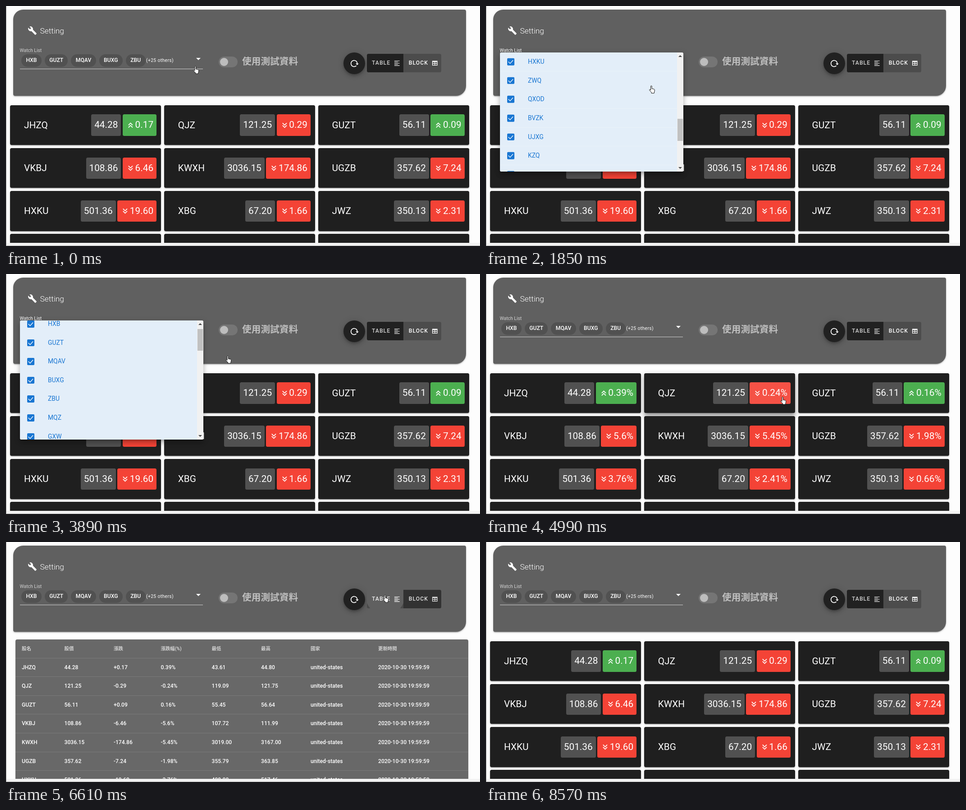
These frames come from a looping animation (1052x532 px, 9.6 s). An HTML page:

```html
<!DOCTYPE html>
<html lang="zh-TW">
<head>
<meta charset="utf-8">
<title>Watch list</title>
<style>
html, body { margin: 0; width: 100%; height: 100%; overflow: hidden; background: #fdfdfd; }
#stage { position: absolute; width: 1052px; height: 532px; overflow: hidden; color: #fff;
  font: 12.13px Roboto, "Noto Sans CJK TC", "Noto Sans CJK", sans-serif; }
#stage div { position: absolute; box-sizing: border-box; white-space: nowrap; }
svg { display: block; fill: none; stroke: currentColor; stroke-width: 2; }
.panel { background: #606060; border-radius: 22px 4px 22px 4px; }
.panel, .card, .table { box-shadow: 0 3px 1px -2px #0003, 0 2px 2px #0002, 0 1px 5px #0002; }
.chips { display: flex; gap: 7px; line-height: 27.7px; font-weight: 500; }
.chips span { background: #515151; border-radius: 14px; padding: 0 10.4px; }
.fab { background: #212121; border-radius: 50%; padding: 14px; box-shadow: 0 3px 5px -1px #0003, 0 5px 9px #0002, 0 1px 16px #0002; }
.button { font-weight: 500; letter-spacing: 1.08px; line-height: 41.6px; padding-left: 11.5px; }
.button svg { position: absolute; right: 6.5px; top: 13px; }
.card { background: #1f1f1f; border-radius: 3.5px; font-size: 20.8px; line-height: 88px; padding-left: 31px; }
.card.raised { box-shadow: 0 5px 5px -3px #0004, 0 8px 10px 1px #0003, 0 3px 12px 2px #0002; }
.badges { right: 10px; top: 20.5px; display: flex; gap: 3.5px; line-height: 47.3px; }
.badges span { display: flex; align-items: center; height: 47.3px; padding: 0 6.93px; border-radius: 3.5px; background-color: #515151; }
.badges b { font-weight: 400; }
.badges .up { background-color: #4caf50; }
.badges .down { background-color: #f44336; }
.down svg { transform: scaleY(-1); }
.table { background: #1e1e1e; border-radius: 4px; font-weight: 500; }
.row { line-height: 41.6px; border-bottom: 1px solid #ffffff1f; }
.head { font-size: 10.4px; font-weight: 700; color: #ffffffb8; }
.menu { overflow: hidden; background: #fff; border-radius: 3.5px;
  box-shadow: 0 5px 5px -3px #0003, 0 8px 10px 1px #0002, 0 3px 14px 2px #0002; }
.item { line-height: 41.6px; padding-left: 62.5px; background: #e3eef9; color: #1976d2; font-size: 13.87px; }
.item svg { position: absolute; left: 16.6px; top: 13px; background: currentColor; border-radius: 2px; stroke: #fff; }
.arrow { border: 4px solid transparent; }
</style>
</head>
<body>
<div id="stage"></div>
<script>
const icons = {
  chevrons: 'M6.7 17.7 12 12.4 17.3 17.7M6.7 11.7 12 6.4 17.3 11.7',
  reload: 'M16.7 17.7A8 8 0 1 1 19 12M17.4 13H20.6L19 14.6Z',
  lines: 'M3 4H21M3 8H15M3 12H21M3 16H15M3 20H21',
  grid: 'M4 5H20V19H4ZM4 7H20M4 13H20M12 8V19',
  check: 'M4 12 10 18 20 7',
  wrench: 'M22.7 19 13.6 9.9A7 7 0 0 0 4.7 1.7L9 6 6 9 1.6 4.7A7 7 0 0 0 9.8 13.6L18.9 22.7Q19.6 23.3 20.3 22.7L22.6 20.4Q23.3 19.7 22.7 19Z'
};
const icon = (name, size = 20.8, attributes = '') =>
  `<svg width="${size}" height="${size}" viewBox="0 0 24 24"><path d="${icons[name]}" ${attributes}/></svg>`;

const stage = document.getElementById('stage');
function add(parent, cls, x, y, w, h, html = '', css = '') {
  const el = document.createElement('div');
  const px = v => v === null ? 'auto' : v + 'px';
  el.className = cls;
  el.style.cssText = `left:${px(x)};top:${px(y)};width:${px(w)};height:${px(h)};${css}`;
  el.innerHTML = html;
  parent.append(el);
  return el;
}
const label = (x, mid, size, html, css = '') =>
  add(stage, '', x, mid - 15, null, 30, html, `font-size:${size}px;line-height:30px;${css}`);

// symbol, price, change, low, high; the percentage follows from price and change
const stocks = `JHZQ 44.28 +0.17 43.61 44.80
QJZ 121.25 -0.29 119.09 121.75
GUZT 56.11 +0.09 55.45 56.64
VKBJ 108.86 -6.46 107.72 111.99
KWXH 3036.15 -174.86 3019.00 3167.00
UGZB 357.62 -7.24 355.79 363.85
HXKU 501.36 -19.60 498.88 517.46
XBG 67.20 -1.66
JWZ 350.13 -2.31`.split('\n').map(line => {
  const [symbol, price, change, low, high] = line.split(' ');
  const percent = +(100 * change / (price - change)).toFixed(2) + '%';
  return { symbol, price, change, percent, low, high };
});
const watchList = ('HXB GUZT MQAV BUXG ZBU MQZ GXW JWZ XBG VZWJ QBUD QJZ UGZB KWXH XJ JHZQ VKBJ HXKU ' +
  'ZWQ QXOD BVZK UJXG KZQ XOWB DZVJ HQZU WXJ GVQK ZUJX YKZB').split(' ');
const pitch = 41.6;

// settings panel
add(stage, 'panel', 16, 8, 1005, 191);
add(stage, '', 48, 43.5, 20.8, 20.8, icon('wrench', 20.8, 'fill="currentColor" stroke="none"'));
label(75.5, 54.5, 17.33, 'Setting', 'font-weight:300');
const fieldLabel = label(30.5, 99, 10.4, 'Watch List');
add(stage, 'chips', 34, 107, null, 27.7, watchList.slice(0, 5).map(name => `<span>${name}</span>`).join(''));
label(311, 120.5, 10.4, '(+25 others)', 'letter-spacing:.35px');
add(stage, 'arrow', 421.5, 114.5, 0, 0, '', 'border-width:5px;border-top-color:#fff');
add(stage, '', 30.5, 139, 406.5, 1, '', 'background:#cfcfcf');
add(stage, '', 472, 111.5, 41.6, 24.3, '', 'background:#757575;border-radius:13px');
add(stage, '', 475, 115, 18, 18, '', 'background:#bdbdbd;border-radius:50%');
label(524, 123, 20.7, '使用測試資料', 'color:#bfbfbf;font-weight:700');
add(stage, 'fab', 748.5, 102.5, 48.5, 48.5, icon('reload'));
const tableButton = add(stage, 'button', 800.5, 105.5, 82, pitch, 'TABLE' + icon('lines', 15.6), 'border-radius:3.5px 0 0 3.5px');
const blockButton = add(stage, 'button', 882.3, 105.5, 84, pitch, 'BLOCK' + icon('grid', 15.6), 'border-radius:0 3.5px 3.5px 0');

// cards
const cardView = add(stage, '', 0, 0, 1052, 532);
const cards = [];
for (let i = 0; i < 12; i++) {
  const stock = stocks[i];
  const card = add(cardView, 'card', 9 + i % 3 * 341.8, 219.8 + Math.floor(i / 3) * 95.2, 335, 88.4);
  if (!stock) continue;
  const way = stock.change > 0 ? 'up' : 'down';
  card.innerHTML = `${stock.symbol}<div class="badges"><span>${stock.price}</span><span class="${way}">${icon('chevrons')}<b></b></span></div>`;
  cards.push({ card, stock, badge: card.querySelector('.' + way), value: card.querySelector('b') });
}

// table
const table = add(stage, 'table', 16, 216, 1005, 330);
const columns = [14, 108.5, 218, 322.5, 435.5, 545, 655, 805];
const rows = stocks.slice(0, 7).map(s =>
  [s.symbol, s.price, s.change, s.percent, s.low, s.high, 'united-states', '2020-10-30 19:59:59']);
[['股名', '股價', '漲跌', '漲跌幅(%)', '最低', '最高', '國家', '更新時間'], ...rows].forEach((cells, i) => {
  const row = add(table, i ? 'row' : 'row head', 0, i * pitch, 1005, pitch);
  cells.forEach((text, k) => add(row, '', columns[k], 0, null, pitch, text));
});

// window edges
add(stage, '', 0, 525, 1052, 7, '', 'background:#f3f3f3;border-bottom:1px solid #a8a8a8');
add(stage, '', 0, 0, 1, 532, '', 'background:#a0a0a0');

// dropdown menu
const menu = add(stage, 'menu', 30.5, 103, 407.5, 263.5);
const list = add(menu, '', 0, 0, 394, 1262);
const items = watchList.map((name, i) => add(list, 'item', 0, 7 + i * pitch, 394, pitch + .2, icon('check', 15.6) + name));
add(menu, '', 393.5, 0, 14, 264, '', 'background:#f1f1f1');
const thumb = add(menu, '', 394.5, 15, 11.5, 70, '', 'background:#c1c1c1');
add(menu, 'arrow', 396, 2, 0, 0, '', 'border-bottom-color:#444');
add(menu, 'arrow', 396, 254, 0, 0, '', 'border-top-color:#444');

const pointer = add(stage, '', 0, 0, 15, 18, `<svg width="15" height="18"><path fill="#fff" stroke="#111" stroke-width="1"
  d="M4.5 1.7C4.5 0 7 0 7 1.7V7L12 8Q14 9 13 12L12 17H6V15L2 11C1 9 2 8 3 9L4.5 10.4Z"/></svg>`);

const clamp = v => Math.max(0, Math.min(1, v));
const smooth = v => v * v * (3 - 2 * v);
const linear = (t, start, end) => clamp((t - start) / (end - start));
const phase = (t, start, end) => smooth(linear(t, start, end));
const mix = (a, b, p) => a + (b - a) * p;

// start, end, x, y of each pointer move
const moves = [[40, 320, 423, 127], [670, 990, 405, 173], [1250, 2590, 319, 202], [3160, 3610, 494, 190],
  [3890, 4190, 660, 281], [5480, 6100, 843, 126], [7100, 7300, 906, 130], [7480, 7600, 926, 134], [7850, 8500, 985, 548]];
const pointerAt = t => moves.reduce(([x, y], [start, end, toX, toY]) => {
  const p = phase(t, start, end);
  return [mix(x, toX, p), mix(y, toY, p)];
}, [422, 142]);

const scrollAt = t => 999 * linear(t, 1110, 2090) ** 1.2 - 979 * (1 - (1 - linear(t, 2140, 3100)) ** 1.7);

function hits(el, x, y) {
  const r = el.getBoundingClientRect();
  return x > r.left && x < r.right && y > r.top && y < r.bottom;
}

// hover tint plus click ripples
function tint(el, t, x, y, hover, clicks) {
  const r = el.getBoundingClientRect();
  const layers = hover ? ['linear-gradient(#ffffff14, #ffffff14)'] : [];
  for (const click of clicks) {
    const age = t - click;
    if (age < 0 || age > 260) continue;
    const radius = 58 * Math.sqrt(age / 380);
    const alpha = .24 * (1 - phase(age, 160, 260));
    layers.push(`radial-gradient(circle at ${x - r.left}px ${y - r.top}px, rgba(255,255,255,${alpha}) ${radius}px, transparent ${radius + 1}px)`);
  }
  el.style.backgroundImage = layers.join() || 'none';
}

function render(t) {
  const [x, y] = pointerAt(t);
  pointer.style.transform = `translate(${x - 7.5}px, ${y - 9}px)`;
  const tipX = x - 2, tipY = y - 8;

  const opened = phase(t, 670, 970), closed = phase(t, 3890, 4180);
  menu.style.opacity = opened * (1 - closed);
  menu.style.transform = `translateY(${-13 * closed}px)`;
  fieldLabel.style.color = opened > 0 && closed < 1 ? '#fff' : '#d2d2d2';
  const scroll = scrollAt(t);
  list.style.transform = `translateY(${-scroll - 13 * (1 - opened)}px)`;
  const total = 14 + pitch * (t < 1530 ? 20 : 30);
  thumb.style.top = 15 + scroll / total * 233.5 + 'px';
  thumb.style.height = 263.5 / total * 233.5 + 'px';
  items.forEach(el => {
    el.style.backgroundColor = t > 3160 && t < 3890 && hits(el, tipX, tipY) ? '#d9e5f2' : '';
  });

  const toTable = phase(t, 6427, 6727), toCards = phase(t, 7770, 8070);
  const cardsShown = t < 6427 || t >= 7770;
  cardView.style.opacity = t < 6427 ? 1 : toCards;
  table.style.opacity = t < 7770 ? toTable : 0;
  table.style.transform = `translateX(${15 * (1 - toTable)}px)`;

  const percent = t >= 4540 && t < 5330;
  cards.forEach(({ card, stock, badge, value }, i) => {
    const text = (percent ? stock.percent : stock.change).replace(/^[+-]/, '');
    if (value.textContent !== text) value.textContent = text;
    card.classList.toggle('raised', cardsShown && hits(card, tipX, tipY));
    tint(badge, t, tipX, tipY, cardsShown && hits(badge, tipX, tipY), i === 1 ? [4470, 5260] : []);
  });

  const tableOn = phase(t, 6440, 6740) * (1 - phase(t, 7700, 7980));
  [[tableButton, tableOn, 6400], [blockButton, 1 - tableOn, 7560]].forEach(([el, on, click]) => {
    const shade = mix(33, 76, on), ink = mix(208, 255, on);
    el.style.backgroundColor = `rgb(${shade},${shade},${shade})`;
    el.style.color = `rgb(${ink},${ink},${ink})`;
    tint(el, t, tipX, tipY, hits(el, tipX, tipY), [click]);
  });
}

function loop(now) {
  render(now % 9600);
  requestAnimationFrame(loop);
}
render(0);
requestAnimationFrame(loop);
</script>
</body>
</html>
```
